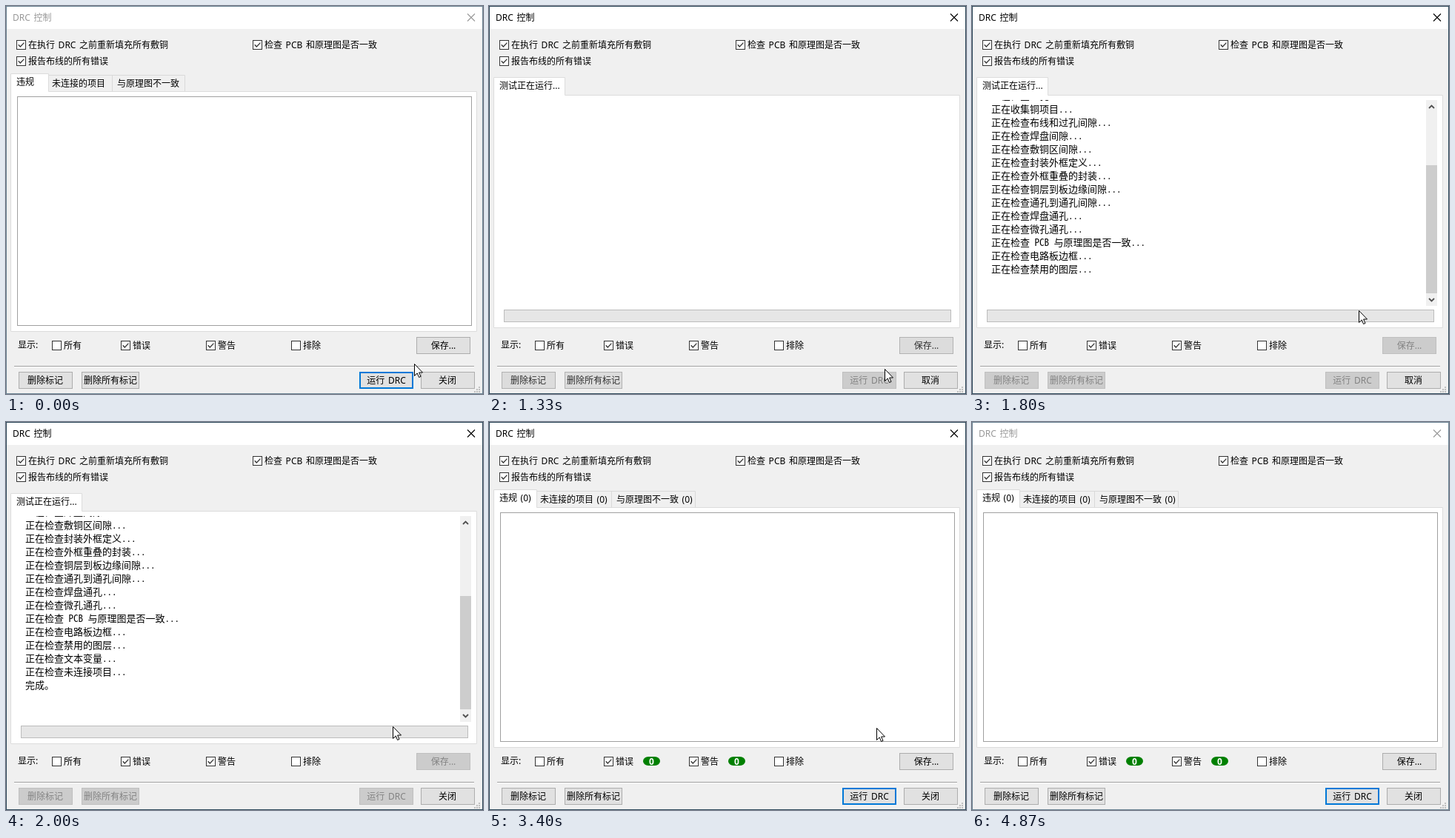
Animation, 644 px wide and 524 px high, one loop 5070 ms. Source, as an HTML page:

```html
<!DOCTYPE html>
<html lang="zh-CN">
<head>
<meta charset="utf-8">
<title>DRC 控制</title>
<style>
html, body { margin: 0; width: 100%; height: 100%; overflow: hidden; background: #f0f0f0; }
svg { display: block; }
text { font: 12px "Noto Sans", "Noto Sans CJK SC", sans-serif; word-spacing: 1.5px; }
.log text { font: 13px "Noto Sans Mono CJK SC", "Noto Sans CJK SC", monospace; word-spacing: 0; }
.button text, .badge text { text-anchor: middle; }
.badge text { font-weight: bold; fill: #fff; }
.badge rect { fill: #008000; }
.page { fill: #fff; stroke: #dcdcdc; }
.tab { fill: #f0f0f0; stroke: #d9d9d9; }
.list { fill: #fff; stroke: #a0a0a0; }

.button { --bg: #e1e1e1; --line: #adadad; --ring: none; --ink: #000; }
.button .face { fill: var(--bg); stroke: var(--line); }
.button .ring { fill: none; stroke: var(--ring); }
.button text { fill: var(--ink); }
.title { --ink: #999; --edge: #6b8494; }
.title text { fill: var(--ink); }
.title path { stroke: var(--ink); fill: none; stroke-width: 1.1; }
.title rect { stroke: var(--edge); fill: none; }

.title, .idle, .running, .done, .list.result, .lock, .run, .close,
.cancel, .shut, .scroll, .cover, .bar, .thumb, .cursor { animation: 5070ms step-end infinite; }
.title { animation-name: active; }
.idle { animation-name: idle; }
.running { animation-name: running; }
.done { animation-name: done; }
.list.result { animation-name: result; }
.lock { animation-name: lock; }
.run { animation-name: run; }
.close { animation-name: close; }
.cancel { animation-name: cancel; }
.shut { animation-name: shut; }
.scroll { animation-name: scroll; }
.cover { animation-name: cover; }
.bar { animation-name: bar; }
.thumb { animation-name: thumb; }
.cursor { animation-name: cursor; }

@keyframes active {
  0%, 96.05% { --ink: #999; --edge: #6b8494; }
  11.83% { --ink: #000; --edge: #2f4a5c; }
}
@keyframes idle { 0% { visibility: visible; } 26.23%, 100% { visibility: hidden; } }
@keyframes running { 0%, 49.9%, 100% { visibility: hidden; } 26.23% { visibility: visible; } }
@keyframes done { 0% { visibility: hidden; } 49.9%, 100% { visibility: visible; } }
@keyframes result { 0% { fill: #f0f0f0; } 51.28%, 100% { fill: #fff; } }
@keyframes cancel { 0%, 39.44%, 100% { visibility: hidden; } 26.23% { visibility: visible; } }
@keyframes shut { 0%, 39.44%, 100% { visibility: visible; } 26.23% { visibility: hidden; } }
@keyframes lock {
  0%, 51.28%, 100% { --bg: #e1e1e1; --line: #adadad; --ink: #000; }
  26.23% { --bg: #dcdcdc; --line: #b2b2b2; --ink: #303030; }
  28.99% { --bg: #d3d3d3; --line: #b8b8b8; --ink: #606060; }
  31.55% { --bg: #ccc; --line: #bfbfbf; --ink: #838383; }
}
@keyframes run {
  0%, 51.28%, 89.34%, 100% { --bg: #e1e1e1; --line: #0078d7; --ring: #0078d7; --ink: #000; }
  6.5% { --bg: #e2e6ea; --line: #0078d7; --ring: #4ca0e3; --ink: #000; }
  7.88%, 88.16% { --bg: #e4ecf3; --line: #0078d7; --ring: #98c9ec; --ink: #000; }
  9.27%, 80.27% { --bg: #e5f1fb; --line: #0078d7; --ring: none; --ink: #000; }
  11.83% { --bg: #d8ebf9; --line: #0066b6; --ring: none; --ink: #000; }
  13.21% { --bg: #cce4f7; --line: #005499; --ring: none; --ink: #000; }
  26.23% { --bg: #ccc; --line: #bfbfbf; --ring: none; --ink: #838383; }
}
@keyframes close {
  0%, 80.27%, 100% { --bg: #e1e1e1; --line: #adadad; }
  73.56%, 78.89% { --bg: #e3e9ee; --line: #5693c2; }
  74.95% { --bg: #e5f1fb; --line: #0078d7; }
}
@keyframes cover {
  0% { transform: none; }
  27.61% { transform: translateY(18px); }
  28.99% { transform: translateY(36px); }
  30.17% { transform: translateY(54px); }
  31.55% { transform: translateY(72px); }
  32.93% { transform: translateY(144px); }
  34.12% { transform: translateY(216px); }
  35.5% { transform: translateY(342px); }
  36.88% { transform: translateY(360px); }
  38.06% { transform: translateY(378px); }
  39.44%, 100% { transform: translateY(396px); }
}
@keyframes scroll {
  0% { transform: none; }
  35.5% { transform: translateY(-112px); }
  36.88% { transform: translateY(-130px); }
  38.06% { transform: translateY(-148px); }
  39.44%, 100% { transform: translateY(-166px); }
}
@keyframes bar { 0%, 49.9%, 100% { visibility: hidden; } 35.5% { visibility: visible; } }
@keyframes thumb {
  0% { transform: none; }
  36.88% { transform: translateY(7px); }
  38.06% { transform: translateY(14px); }
  39.44%, 100% { transform: translateY(20px); }
}
@keyframes cursor {
  0% { transform: translate(551px, 483px); }
  1.38% { transform: translate(550px, 484px); }
  2.56% { transform: translate(548px, 486px); }
  3.94% { transform: translate(545px, 489px); }
  5.32% { transform: translate(541px, 493px); }
  6.5% { transform: translate(538px, 495px); }
  7.88% { transform: translate(536px, 496px); }
  9.27% { transform: translate(535px, 497px); }
  26.23% { transform: translate(534px, 490px); }
  27.61% { transform: translate(532px, 472px); }
  28.99% { transform: translate(529px, 451px); }
  30.17% { transform: translate(527px, 435px); }
  31.55% { transform: translate(525px, 424px); }
  32.93% { transform: translate(523px, 416px); }
  34.12% { transform: translate(522px, 412px); }
  35.5% { transform: translate(522px, 411px); }
  67.06% { transform: translate(523px, 413px); }
  68.44% { transform: translate(528px, 425px); }
  69.62% { transform: translate(536px, 445px); }
  71% { transform: translate(546px, 468px); }
  72.38% { transform: translate(556px, 488px); }
  73.56% { transform: translate(563px, 500px); }
  74.95% { transform: translate(567px, 506px); }
  76.33% { transform: translate(568px, 508px); }
  77.51% { transform: translate(562px, 508px); }
  78.89% { transform: translate(551px, 508px); }
  80.27% { transform: translate(540px, 508px); }
  81.45% { transform: translate(524px, 509px); }
  82.84% { transform: translate(500px, 510px); }
  84.22% { transform: translate(462px, 512px); }
  85.4% { transform: translate(400px, 514px); }
  86.78% { transform: translate(293px, 517px); }
  88.16% { transform: translate(76px, 521px); }
  89.34%, 100% { transform: translate(0, 600px); }
}
</style>
</head>
<body>
<svg width="644" height="524" viewBox="0 0 644 524">
  <defs>
    <g id="box"><rect x=".5" y=".5" width="12" height="12" fill="#fff" stroke="#333"/></g>
    <g id="check">
      <use href="#box"/>
      <path d="M2.7 6.2L5.3 9L10.4 3.6" fill="none" stroke="#333" stroke-width="1.3"/>
    </g>
    <clipPath id="view"><path d="M7 127H613V405H7Z"/></clipPath>
  </defs>

  <rect width="644" height="524" fill="#f0f0f0"/>
  <rect width="644" height="31" fill="#fff"/>

  <use href="#check" x="14" y="46"/><text x="30" y="57">在执行 DRC 之前重新填充所有敷铜</text>
  <use href="#check" x="333" y="46"/><text x="349" y="57">检查 PCB 和原理图是否一致</text>
  <use href="#check" x="14" y="68"/><text x="30" y="79">报告布线的所有错误</text>

  <g class="idle">
    <path class="tab" d="M57.5 115.5V93.5H241.5V115.5M143.5 93.5V115.5"/>
    <path class="page" d="M6.5 439.5V91.5H57.5V115.5H635.5V439.5Z"/>
    <text x="14" y="107">违规</text>
    <text x="62" y="109">未连接的项目</text>
    <text x="150" y="109">与原理图不一致</text>
    <rect class="list" x="15.5" y="122.5" width="613" height="309"/>
  </g>

  <g class="running">
    <path class="page" d="M6.5 434.5V96.5H102.5V120.5H635.5V434.5Z"/>
    <text x="14" y="112">测试正在运行...</text>
    <g clip-path="url(#view)">
      <g class="log scroll">
        <text y="130">
          <tspan x="26" dy="18">重新填充所有敷铜...</tspan>
          <tspan x="26" dy="18">细分敷铜区...</tspan>
          <tspan x="26" dy="18">检查过孔环形孔...</tspan>
          <tspan x="26" dy="18">正在检查孔尺寸...</tspan>
          <tspan x="26" dy="18">正在检查布线宽度...</tspan>
          <tspan x="26" dy="18">正在检查过孔...</tspan>
          <tspan x="26" dy="18">正在收集铜项目...</tspan>
          <tspan x="26" dy="18">正在检查布线和过孔间隙...</tspan>
          <tspan x="26" dy="18">正在检查焊盘间隙...</tspan>
          <tspan x="26" dy="18">正在检查敷铜区间隙...</tspan>
          <tspan x="26" dy="18">正在检查封装外框定义...</tspan>
          <tspan x="26" dy="18">正在检查外框重叠的封装...</tspan>
          <tspan x="26" dy="18">正在检查铜层到板边缘间隙...</tspan>
          <tspan x="26" dy="18">正在检查通孔到通孔间隙...</tspan>
          <tspan x="26" dy="18">正在检查焊盘通孔...</tspan>
          <tspan x="26" dy="18">正在检查微孔通孔...</tspan>
          <tspan x="26" dy="18">正在检查 PCB 与原理图是否一致...</tspan>
          <tspan x="26" dy="18">正在检查电路板边框...</tspan>
          <tspan x="26" dy="18">正在检查禁用的图层...</tspan>
          <tspan x="26" dy="18">正在检查文本变量...</tspan>
          <tspan x="26" dy="18">正在检查未连接项目...</tspan>
          <tspan x="26" dy="18">完成。</tspan>
        </text>
        <rect class="cover" x="7" y="134" width="606" height="500" fill="#fff"/>
      </g>
    </g>
    <g class="bar">
      <rect x="613" y="127" width="15" height="278" fill="#f0f0f0"/>
      <svg x="613" y="144" width="15" height="244">
        <rect class="thumb" y="71" width="15" height="173" fill="#cdcdcd"/>
      </svg>
      <path d="M617 138L620.5 134.5L624 138M617 395L620.5 398.5L624 395" fill="none" stroke="#505050" stroke-width="1.8"/>
    </g>
    <rect x="20.5" y="410.5" width="603" height="16" fill="#e6e6e6" stroke="#bcbcbc"/>
  </g>

  <g class="done">
    <path class="tab" d="M64.5 115.5V93.5H278.5V115.5M165.5 93.5V115.5"/>
    <path class="page" d="M6.5 439.5V91.5H64.5V115.5H635.5V439.5Z"/>
    <text x="14" y="107">违规 (0)</text>
    <text x="69" y="109">未连接的项目 (0)</text>
    <text x="172" y="109">与原理图不一致 (0)</text>
    <rect class="list result" x="15.5" y="122.5" width="613" height="309"/>
    <rect x="16.5" y="123.5" width="611" height="307" fill="none" stroke="#fff"/>
    <g class="badge">
      <rect x="208" y="452" width="23" height="12" rx="7" ry="6"/><text x="219.5" y="462.5">0</text>
      <rect x="323" y="452" width="23" height="12" rx="7" ry="6"/><text x="334.5" y="462.5">0</text>
    </g>
  </g>

  <text x="16" y="462">显示:</text>
  <use href="#box" x="62" y="452"/><text x="78" y="463">所有</text>
  <use href="#check" x="155" y="452"/><text x="171" y="463">错误</text>
  <use href="#check" x="270" y="452"/><text x="286" y="463">警告</text>
  <use href="#box" x="385" y="452"/><text x="401" y="463">排除</text>

  <path d="M11 486.5H632" stroke="#a0a0a0"/>
  <path d="M11 487.5H632" stroke="#fff"/>

  <g class="button lock">
    <rect class="face" x="554.5" y="447.5" width="72" height="22"/><text x="590.5" y="463">保存...</text>
    <rect class="face" x="17.5" y="494.5" width="72" height="22"/><text x="53" y="510">删除标记</text>
    <rect class="face" x="102.5" y="494.5" width="77" height="22"/><text x="141" y="510">删除所有标记</text>
  </g>
  <g class="button run">
    <rect class="face" x="477.5" y="494.5" width="72" height="22"/>
    <rect class="ring" x="478.5" y="495.5" width="70" height="20"/>
    <text x="513.5" y="510">运行 DRC</text>
  </g>
  <g class="button close">
    <rect class="face" x="560.5" y="494.5" width="72" height="22"/>
    <text class="shut" x="596" y="510">关闭</text>
    <text class="cancel" x="596" y="510">取消</text>
  </g>

  <path d="M638 514h2v2h-2zM635 517h2v2h-2zM638 517h2v2h-2zM632 520h2v2h-2zM635 520h2v2h-2zM638 520h2v2h-2z" fill="#bfbfbf"/>

  <g class="title">
    <text x="9" y="20">DRC 控制</text>
    <path d="M623 10.5L633 20.5M633 10.5L623 20.5"/>
    <rect x=".5" y=".5" width="643" height="523"/>
  </g>

  <path class="cursor" d="M.5 .5V16.5L4.2 12.9L6.6 18.5L9 17.4L6.6 12H11.5Z" fill="#fff" stroke="#000"/>
</svg>
</body>
</html>
```
